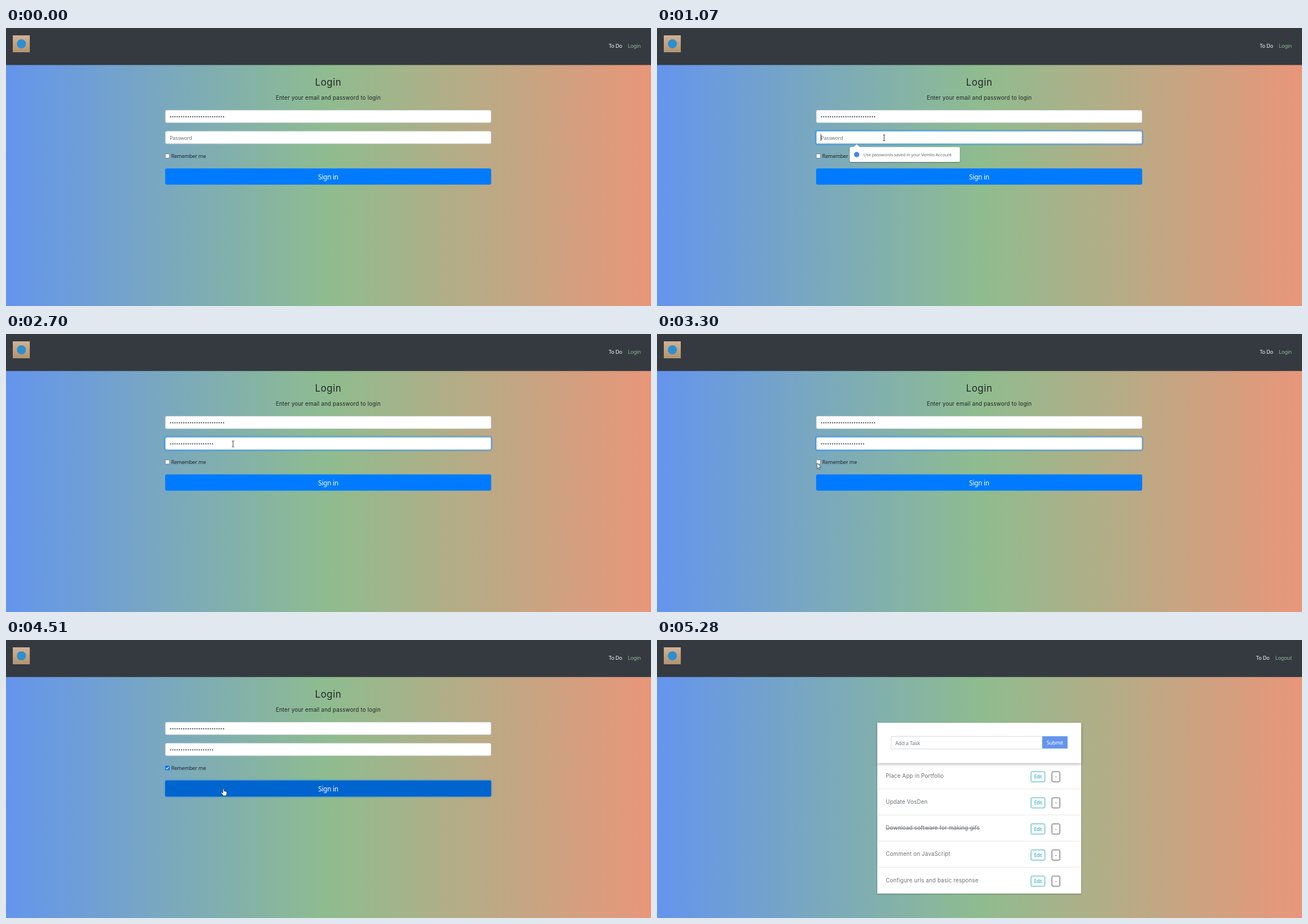
These frames come from a looping animation (1139x492 px, 5990 ms). An HTML page:

```html
<!DOCTYPE html>
<html lang="en">
<head>
<meta charset="utf-8">
<title>To Do login</title>
<style>
  html, body { margin: 0; width: 100%; height: 100%; overflow: hidden; }
  svg { display: block; width: 100%; height: 100%; }
  text { font: 9.1px "Noto Sans", "Open Sans", sans-serif; letter-spacing: -.02em; white-space: pre; }
  .wide { font: 9.7px Inter, sans-serif; letter-spacing: .02em; fill: #212529; }
  .title { font-size: 16.9px; letter-spacing: .03em; }
  .mid { text-anchor: middle; }
  .end { text-anchor: end; }
  .hint { fill: #6c757d; }
  .ink { fill: #212529; }
  .white { fill: #fff; }
  .green { fill: #8fbc8f; }
  .big { font-size: 11.7px; }
  .small { font-size: 8.1px; }
  .tip { font-size: 7.7px; fill: #666a6e; }
  .field { fill: #fff; stroke: #ced4da; stroke-width: .9; }
  .dots { fill: none; stroke: #495057; stroke-width: 2.3; stroke-linecap: round; stroke-dasharray: 0 3.9; }
  .done { text-decoration: line-through; }
  #list .wide { fill: #6b7075; }

  /* one loop; hard switches use step-end, fades and motion are linear */
  .cut, .fade { animation: 5990ms infinite; }
  .cut { animation-timing-function: step-end; }
  .fade { animation-timing-function: linear; }

  #login  { animation-name: login; }
  #todo   { animation-name: todo; }
  #list   { animation-name: list; }
  #hint   { animation-name: hint; }
  #pass   { animation-name: pass; }
  #caretA { animation-name: caretA; }
  #caretB { animation-name: caretB; }
  #check  { animation-name: check; }
  #ring   { animation-name: ring; }
  #popup  { animation-name: popup; }
  #btn    { animation-name: btn; }
  #btnRing { animation-name: btnRing; }
  #cursor { animation-name: move; }
  #arrow  { animation-name: arrow; }
  #hand   { animation-name: hand; }
  #beam   { animation-name: beam; }

  @keyframes login { 0% { opacity: 1 } 79.632%, 100% { opacity: 0 } }
  @keyframes todo  { 0% { opacity: 0 } 79.632%, 100% { opacity: 1 } }
  @keyframes list  { 0% { opacity: 0 } 81.468%, 100% { opacity: 1 } }
  @keyframes hint  { 0% { opacity: 1 } 36.227%, 100% { opacity: 0 } }
  @keyframes pass  { 0% { opacity: 0 } 36.227%, 100% { opacity: 1 } }
  @keyframes caretA {
    0% { opacity: 0 } 13.355% { opacity: 1 } 25.208% { opacity: 0 }
    33.722% { opacity: 1 } 36.227%, 100% { opacity: 0 }
  }
  @keyframes caretB { 0% { opacity: 0 } 36.227% { opacity: 1 } 45.074%, 100% { opacity: 0 } }
  @keyframes check { 0% { opacity: 0 } 56.761%, 100% { opacity: 1 } }
  @keyframes ring {
    0%, 13.356% { opacity: 0 } 15.86%, 55.092% { opacity: 1 } 57.596%, 100% { opacity: 0 }
  }
  @keyframes popup {
    0%, 14.691% { opacity: 0 } 17.863%, 36.227% { opacity: 1 } 39.399%, 100% { opacity: 0 }
  }
  @keyframes btn {
    0%, 7.679% { fill: #007bff } 8.731% { fill: #0074f0 } 10%, 48.414% { fill: #007bff }
    50.918%, 51.836% { fill: #0069d9 } 54.341%, 67.028% { fill: #007bff }
    69.533%, 73.79% { fill: #0069d9 } 75% { fill: #0062cc } 76.294%, 100% { fill: #0069d9 }
  }
  @keyframes btnRing { 0%, 73.79% { opacity: 0 } 76.294%, 100% { opacity: 1 } }
  @keyframes move {
    0%, 3.338% { transform: translate(530px, 444px) }
    5.008% { transform: translate(505px, 392px) }
    6.678% { transform: translate(470px, 325px) }
    7.679% { transform: translate(447px, 278px) }
    9.015% { transform: translate(425px, 240px) }
    10.017% { transform: translate(408px, 206px) }
    11.018% { transform: translate(403px, 195px) }
    12.354%, 45.075% { transform: translate(401px, 194px) }
    46.744% { transform: translate(394px, 220px) }
    48.414% { transform: translate(384px, 249px) }
    49.916% { transform: translate(365px, 258px) }
    51.419% { transform: translate(335px, 252px) }
    53.088% { transform: translate(302px, 238px) }
    54.758% { transform: translate(283px, 228px) }
    58.43% { transform: translate(278px, 230px) }
    61.769% { transform: translate(279px, 231px) }
    64.942% { transform: translate(297px, 235px) }
    65.943% { transform: translate(309px, 240.5px) }
    68.114% { transform: translate(352px, 256px) }
    70.284%, 79.633% { transform: translate(384px, 263px) }
    80.801% { transform: translate(390px, 313.5px) }
    82.137% { transform: translate(475px, 398px) }
    83.472%, 100% { transform: translate(568px, 477px) }
  }
  @keyframes arrow {
    0% { opacity: 0 } 3.338% { opacity: 1 } 7.679% { opacity: 0 } 8.731% { opacity: 1 }
    9.966% { opacity: 0 } 45.776% { opacity: 1 } 48.414% { opacity: 0 } 51.836% { opacity: 1 }
    67.028% { opacity: 0 } 79.632% { opacity: 1 } 88.146%, 100% { opacity: 0 }
  }
  @keyframes hand {
    0% { opacity: 0 } 7.679% { opacity: 1 } 8.731% { opacity: 0 } 48.414% { opacity: 1 }
    51.836% { opacity: 0 } 67.028% { opacity: 1 } 79.632%, 100% { opacity: 0 }
  }
  @keyframes beam { 0% { opacity: 0 } 9.966% { opacity: 1 } 45.776%, 100% { opacity: 0 } }
</style>
</head>
<body>
<svg viewBox="0 0 1139 492" preserveAspectRatio="none">
  <defs>
    <linearGradient id="sky">
      <stop offset="0" stop-color="#6495ed"/>
      <stop offset=".5" stop-color="#8fbc8f"/>
      <stop offset="1" stop-color="#e9967a"/>
    </linearGradient>
    <linearGradient id="tan" x2="0" y2="1">
      <stop offset="0" stop-color="#d2b294"/>
      <stop offset="1" stop-color="#b3936f"/>
    </linearGradient>
    <filter id="soft" x="-10%" y="-30%" width="120%" height="180%">
      <feDropShadow dx="0" dy="2.4" stdDeviation="2.4" flood-opacity=".28"/>
    </filter>
    <filter id="lift" x="-10%" y="-30%" width="120%" height="180%">
      <feDropShadow dx="0" dy="1" stdDeviation="1.2" flood-opacity=".35"/>
    </filter>
    <g id="tools">
      <rect x="660.5" y="233" width="24.5" height="18" rx="1.8" fill="#fff" stroke="#17a2b8" stroke-width=".9"/>
      <text class="small mid" x="672.8" y="245.2" fill="#17a2b8">Edit</text>
      <rect x="697.4" y="233" width="14" height="18" rx="1.8" fill="#fff" stroke="#343a40" stroke-width=".9"/>
      <text class="small mid" x="704.4" y="245.2" fill="#343a40">-</text>
    </g>
  </defs>

  <rect width="1139" height="492" fill="url(#sky)"/>
  <rect width="1139" height="65.5" fill="#343a40"/>
  <rect x="12" y="13" width="30" height="30" fill="url(#tan)"/>
  <circle cx="27.2" cy="28" r="8" fill="#2b8fd0"/>

  <g id="login" class="cut">
    <text class="white end" x="1088" y="35">To Do</text>
    <text class="green end" x="1121" y="35">Login</text>
    <text class="wide title mid" x="569" y="102">Login</text>
    <text class="wide mid" x="569" y="127">Enter your email and password to login</text>

    <rect class="field" x="281.4" y="145.6" width="575" height="22" rx="2.4"/>
    <path class="dots" d="M290.6 157.2h93.7"/>

    <rect class="field" x="281.4" y="182.8" width="575" height="22" rx="2.4"/>
    <g id="ring" class="fade" fill="none">
      <rect x="280" y="181.4" width="577.8" height="24.8" rx="3.6" stroke="#007bff" stroke-opacity=".4" stroke-width="2"/>
      <rect x="281.4" y="182.8" width="575" height="22" rx="2.4" stroke="#80bdff" stroke-width=".9"/>
    </g>
    <text id="hint" class="hint cut" x="289" y="197.6">Password</text>
    <path id="pass" class="dots cut" d="M290.6 194.4h74.2"/>
    <path id="caretA" class="cut" d="M289.5 187.5v12.5" stroke="#333"/>
    <path id="caretB" class="cut" d="M368.5 187.5v12.5" stroke="#333"/>

    <rect x="281.4" y="222.9" width="7.2" height="7.2" rx="1.2" fill="#fff" stroke="#767676" stroke-width=".8"/>
    <g id="check" class="cut">
      <rect x="281" y="222.5" width="8" height="8" rx="1.4" fill="#0075ff"/>
      <path d="M282.6 226.6l1.7 1.7 3.1-3.8" fill="none" stroke="#fff" stroke-width="1.2"/>
    </g>
    <text class="ink" x="291.7" y="230.4">Remember me</text>

    <rect id="btnRing" class="fade" x="280" y="247.4" width="577.8" height="30.9" rx="4" fill="none" stroke="#268fff" stroke-opacity=".5" stroke-width="2"/>
    <rect id="btn" class="fade" x="281" y="248.4" width="575.8" height="28.9" rx="3" fill="#007bff"/>
    <text class="white big mid" x="569" y="267.7">Sign in</text>

    <g id="popup" class="fade">
      <path filter="url(#lift)" fill="#fff" d="M342.5 210.8h4.5l5.6-5 5.6 5h74.8h99.8a2 2 0 0 1 2 2v22.2a2 2 0 0 1-2 2h-190.3a2 2 0 0 1-2-2v-22.2a2 2 0 0 1 2-2z"/>
      <circle cx="352.6" cy="224" r="4.7" fill="#4285f4"/>
      <text class="tip" x="364.5" y="226.9">Use passwords saved in your Vemlio Account</text>
    </g>
  </g>

  <g id="todo" class="cut">
    <text class="white end" x="1081.5" y="35">To Do</text>
    <text class="green end" x="1121" y="35">Logout</text>

    <g id="list" class="cut">
      <rect x="389" y="217" width="360" height="231.7" fill="#fff" filter="url(#lift)"/>
      <path d="M392 263.6h354M392 309.8h354M392 356h354M392 402.2h354" stroke="#e4e6e8"/>
      <text class="wide" x="404" y="243.8">Place App in Portfolio</text>
      <text class="wide" x="404" y="290">Update VosDen</text>
      <text class="wide done" x="404" y="336.2">Download software for making gifs</text>
      <text class="wide" x="404" y="382.4">Comment on JavaScript</text>
      <text class="wide" x="404" y="428.6">Configure urls and basic response</text>
      <use href="#tools"/>
      <use href="#tools" y="46.2"/>
      <use href="#tools" y="92.4"/>
      <use href="#tools" y="138.6"/>
      <use href="#tools" y="184.8"/>
    </g>

    <rect x="389" y="146.6" width="360" height="71" fill="#fff" filter="url(#soft)"/>
    <rect class="field" x="413.4" y="170.6" width="267" height="22.2" rx="1.5"/>
    <text class="hint" x="420.7" y="186">Add a Task</text>
    <rect x="680.3" y="170.3" width="44.7" height="21.8" fill="#6495ed"/>
    <text class="white mid" x="702.6" y="185">Submit</text>
  </g>

  <g id="cursor" class="fade">
    <path id="arrow" class="cut" d="M0 0v10.2l2.3-2.1 1.6 3.7 1.6-.7-1.6-3.6h3.2z" fill="#fff" stroke="#222" stroke-width=".7"/>
    <path id="hand" class="cut" d="M-1 .8q1-1.6 2 0v3.6l4 .8q1.2.3 1.1 1.6l-.5 3.3-1 2.7h-5.2l-1.2-2.4-2.3-3q.6-1.5 2-.4l1.1 1z" fill="#fff" stroke="#222" stroke-width=".7"/>
    <path id="beam" class="cut" d="M-2 -4.8h1.4l.6.5.6-.5h1.4M0 -4.3v9.2M-2 5.4h1.4l.6-.5.6.5h1.4" fill="none" stroke="#222" stroke-width=".9"/>
  </g>
</svg>
</body>
</html>
```
